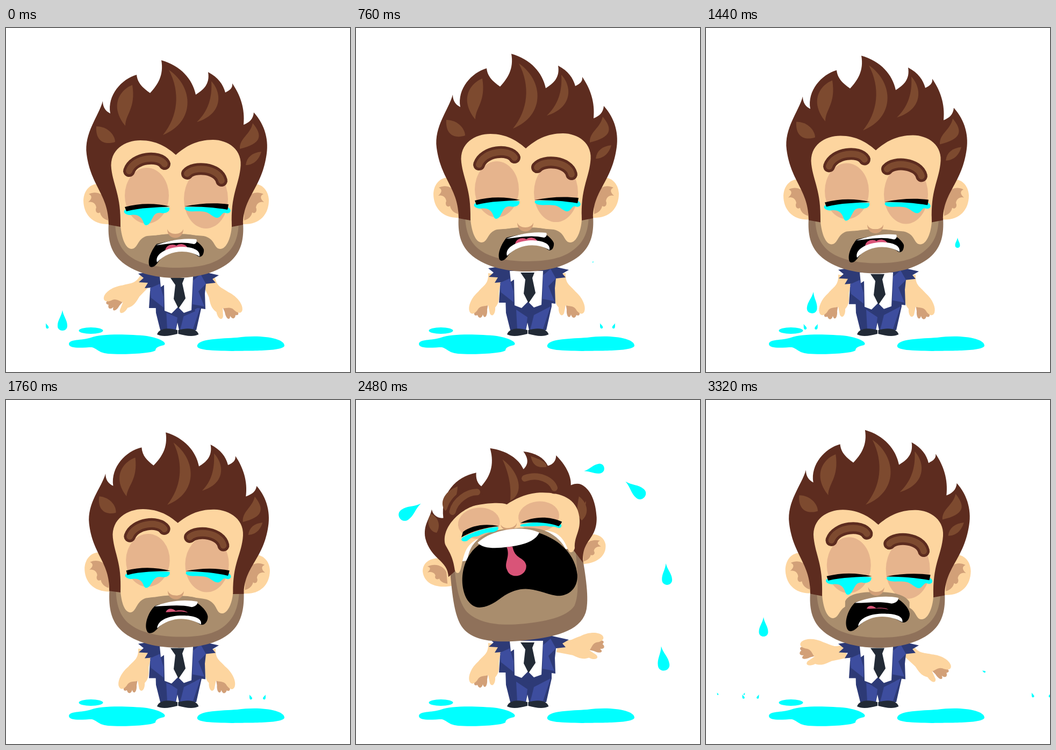
Animation, 640 px wide and 640 px high, one loop 3360 ms. Source, as an HTML page with a canvas:

```html
<!DOCTYPE html>
<html>
<head>
<meta charset="utf-8">
<style>
html, body { margin: 0; width: 100%; height: 100%; overflow: hidden; background: #fff; }
canvas { display: block; }
</style>
</head>
<body>
<canvas id="stage" width="640" height="640"></canvas>
<script>
const ctx = document.getElementById('stage').getContext('2d');
const LOOP = 3360, STEP = 40, GRAVITY = .004, FLOOR = 566;
const SKIN = '#fdd59f', SHADE = '#d2a078', LID = '#e6b48d', HAIR = '#5d2c1f', SHINE = '#7d4a2f',
  BEARD = '#a98d6d', JAW = '#8f715a', TEAR = '#00ffff', NAVY = '#2d3a76', BLUE = '#3d4d9e', DARK = '#222a36';

// Each shape: [calm outline, wailing outline]
const hair = [
  'M191 366C191 310 158 295 150 235C145 195 172 165 180 136C180 148 186 155 194 159C188 125 215 95 243 87C245 104 256 112 268 121C282 106 294 88 289 60C325 70 347 95 353 124C366 116 380 105 376 82C395 92 404 105 408 120C416 116 422 112 421 103C436 125 445 150 442 180C452 176 460 170 461 157C482 180 490 210 484 240C474 300 441 315 441 366L420 370L415 300L220 300L213 370Z',
  'M184 316C186 285 154 280 148 240C146 215 160 205 165 188C166 198 174 206 185 206C184 160 215 132 254 128C252 138 254 148 261 154C278 138 290 118 284 85C314 92 336 110 342 130C352 122 354 112 345 97C368 102 382 112 388 128C398 126 404 120 405 110C420 128 430 150 427 168C440 164 446 168 451 172C466 185 470 210 469 232C466 275 436 270 436 314L421 290L415 240L205 240L198 306Z'];
const shines = [
  ['M168 183C190 183 203 200 203 212C185 218 166 212 168 183Z', 'M163 196C178 205 178 222 170 232C158 230 150 210 163 196Z'],
  ['M235 106C212 115 192 145 222 182C222 160 242 150 235 106Z', 'M217 150C188 158 180 180 190 193C205 182 214 172 217 150Z'],
  ['M303 78C350 110 352 175 292 199C320 165 325 120 303 78Z', 'M305 108C335 135 340 175 312 186C316 165 316 140 305 108Z'],
  ['M382 99C402 120 404 160 355 175C376 155 384 130 382 99Z', 'M358 107C376 115 388 122 385 130C372 130 360 128 358 107Z'],
  ['M459 177C478 200 476 215 435 225C434 205 455 198 459 177Z', 'M440 190C456 205 456 225 441 235C430 222 436 205 440 190Z'],
  ['M475 230C470 248 458 255 446 255C448 240 458 232 475 230Z', 'M452 200C452 205 450 210 448 212C448 206 450 202 452 200Z']];
const jaw = [
  'M191 362L441 362C443 392 438 415 420 432C396 455 355 465 316 465C277 465 236 455 212 432C194 415 189 392 191 362Z',
  'M188 290L434 285C438 330 441 375 434 400C424 436 380 447 316 447C270 447 222 443 202 414C186 390 188 340 188 290Z'];
const beard = [
  'M203 362C204 392 212 412 232 426C252 440 284 446 316 446C350 446 380 442 400 428C424 412 432 392 433 362Z',
  'M197 290C196 330 198 365 212 384C232 408 270 416 312 416C355 416 395 412 412 392C424 372 424 330 424 290Z'];
const skin = [
  'M316 236C334 220 355 208 385 208C412 208 442 226 436 262C432 295 418 310 420 368C419 390 410 412 398 411C386 410 390 392 368 387C340 384 290 384 262 387C244 392 246 410 234 411C222 411 215 390 213 368C214 310 200 295 196 262C192 226 222 209 250 209C280 209 300 222 316 236Z',
  'M305 192C320 184 340 176 362 176C400 177 436 190 437 228C438 255 424 262 423 285C421 290 418 293 414 292C408 290 410 268 390 254C360 236 260 236 232 258C212 272 212 305 204 310C200 311 199 310 197 305C196 280 190 270 184 256C178 222 222 190 250 188C280 186 295 188 305 192Z'];
const moustache = [
  'M262 395C268 384 300 383 316 383C335 383 362 384 370 395L370 420L262 420Z',
  'M222 290C232 236 290 236 312 238C340 236 390 240 408 290L408 300L222 300Z'];
const nose = [
  'M300 374C300 396 330 396 330 374C326 386 304 386 300 374Z',
  'M290 228C290 244 320 244 320 228C316 239 294 239 290 228Z'];
const brows = [
  ['M229 266C238 240 285 236 295 253', 'M203 196C210 175 235 162 252 164'],
  ['M337 271C350 256 395 260 401 284', 'M343 147C370 140 392 155 396 170']];
const lids = [
  [[262, 312, 41, 52], [250, 222, 39, 29]],
  [[372, 318, 41, 55], [362, 220, 38, 28]]];
const lashes = [
  ['M221 333C250 325 280 326 305 332C280 334 250 334 224 341Z', 'M219 235C235 225 262 223 286 231C262 231 236 235 215 245Z'],
  ['M332 332C360 326 390 325 414 328C413 333 413 336 412 338C390 334 360 332 332 332Z', 'M327 229C350 219 380 220 404 234C402 238 399 240 397 242C380 232 350 229 327 229Z']];
const tears = [
  ['M222 338C250 334 280 332 304 334C306 342 296 346 288 344C276 342 274 352 270 358C266 368 258 370 256 362C252 350 244 346 232 348C222 348 216 342 222 338Z',
   'M218 245C240 236 262 232 284 232C288 236 282 240 274 241C262 240 256 242 250 244C246 246 242 246 238 246C234 246 230 250 224 253C214 254 212 248 218 245Z'],
  ['M334 333C360 332 390 334 414 334C422 340 416 347 408 344C402 342 400 352 394 353C386 354 380 344 370 342C358 340 350 342 342 341C334 340 330 336 334 333Z',
   'M328 232C350 228 380 232 400 236C406 242 400 248 394 244C388 240 384 242 378 240C372 238 366 238 360 238C350 237 342 237 336 236C326 236 324 234 328 232Z']];
const mouth = [
  'M280 402C300 397 325 391 350 394C357 398 366 406 368 412C369 420 364 428 358 425C335 408 300 414 284 434C279 442 272 448 267 443C262 430 272 412 280 402Z',
  'M246 262C280 245 330 240 358 250C400 268 423 300 423 335C422 362 400 374 380 370C345 360 325 338 278 364C262 374 248 379 236 378C200 374 196 292 246 262Z'];
const tongue = [
  'M296 414C298 402 312 401 317 405C322 400 334 401 338 409C325 407 310 410 296 414Z',
  'M297 271C303 290 288 300 294 314C298 332 330 330 330 308C328 292 310 296 308 271Z'];
const upperTeeth = [
  'M279 404C300 396 328 390 354 393C356 397 354 401 350 402C325 396 302 402 279 404Z',
  'M244 258C270 236 330 232 360 250C352 266 325 271 300 271C275 272 254 270 244 258Z'];
const lowerTeeth = [
  'M281 436C276 420 300 408 325 407C345 407 362 412 360 425C335 410 302 414 281 436Z',
  'M278 364C325 338 345 360 380 370C380 370 380 370 380 370C345 360 325 338 278 364Z'];

// Drops: time, x, y, vx, vy at that time, age by then, size
const drops = [
  [-50, 88, 566, 0, 1, 100, 1], [0, 105, 545, 0, 1, 200, 1], [340, 182, 560, -.1, 1, 250, 1],
  [440, 468, 394, 0, .1, 45, 1], [1000, 422, 560, -.08, 1, 250, .9], [1080, 217, 364, -.07, 0, 8, 1],
  [1440, 198, 512, -.07, .8, 230, 1.05], [1440, 468, 400, 0, .12, 50, 1],
  [2040, 150, 560, -.1, .9, 150, .8], [2080, 483, 154, .22, .02, 200, 1.2],
  [2480, 578, 325, .08, 1.1, 380, 1.05], [2480, 520, 167, .22, .18, 230, 1.2],
  [2480, 444, 129, .3, -.05, 170, 1], [2480, 100, 207, -.13, .09, 200, 1.25],
  [2800, 90, 230, -.12, .2, 200, 1.1], [2840, 530, 180, .24, .2, 220, 1.1],
  [3250, 83, 562, 0, 1, 200, .9], [3320, 107, 423, 0, .9, 240, .95], [3320, 517, 505, .3, .15, 18, 1]];

// Time, value pairs
const HEAD_Y = [0, 0, 200, -16, 480, -2, 700, -15, 900, 0, 1140, -15.5, 1700, -3, 1860, 0, 2840, 0, 3100, -9, 3320, -4];
const WAIL = [1720, 0, 1900, 1, 2840, 1, 3080, 0];
const MOUTH = [1720, 0, 1900, 1, 2840, 1, 3100, .25, 3320, .15];
const LEAN = [3080, 0, 3320, .7];
const ARM_L = [0, 33, 120, 0, 1740, 0, 2060, 92, 2480, 0, 2860, 92, 3180, 88, 3320, 67];
const ARM_R = [0, 14, 120, 0, 1740, 0, 2080, 58, 2480, 68, 2900, 58, 3200, 55, 3320, 36];

const lerp = (a, b, k) => a + (b - a) * k;

function track(t, keys) {
  if (t <= keys[0]) return keys[1];
  for (let i = 2; i < keys.length; i += 2) {
    if (t <= keys[i]) {
      const p = (t - keys[i - 2]) / (keys[i] - keys[i - 2]);
      return lerp(keys[i - 1], keys[i + 1], (1 - Math.cos(Math.PI * p)) / 2);
    }
  }
  return keys[keys.length - 1];
}

function morph([a, b], k) {
  const ends = b.match(/[\d.]+/g);
  let i = 0;
  return a.replace(/[\d.]+/g, n => lerp(+n, +ends[i++], k).toFixed(2));
}

function fill(path, color) {
  ctx.fillStyle = color;
  ctx.fill(new Path2D(path));
}

function oval(x, y, rx, ry, color) {
  ctx.fillStyle = color;
  ctx.beginPath();
  ctx.ellipse(x, y, rx, ry, 0, 0, 7);
  ctx.fill();
}

function group(draw) {
  ctx.save();
  draw();
  ctx.restore();
}

function turn(deg, x, y) {
  ctx.translate(x, y);
  ctx.rotate(deg * Math.PI / 180);
  ctx.translate(-x, -y);
}

function mirror(axis) {
  ctx.translate(axis * 2, 0);
  ctx.scale(-1, 1);
}

function puddles() {
  fill('M117 588C118 578 140 582 158 576C180 568 230 570 262 573C290 578 300 586 294 590C285 592 278 594 278 600C270 606 215 608 190 606C172 604 172 598 160 594C145 594 118 598 117 588Z', TEAR);
  oval(158, 563, 22.5, 6, TEAR);
  fill('M356 590C360 578 400 578 430 576C470 570 518 576 518 591C516 602 450 600 420 601C385 600 352 600 356 590Z', TEAR);
}

function arm(deg) {
  turn(deg, 258, 470);
  fill('M224 532C217 542 220 547 226 544C228 551 234 551 236 543C238 552 245 548 244 534L246 522L230 522Z', SHADE);
  fill('M246 466C247 486 238 488 228 500C214 512 208 528 211 537C214 545 222 542 227 533C232 526 240 528 246 526L249 541C254 550 260 540 259 530C268 520 266 510 266 500L272 470Z', SKIN);
}

function legs() {
  fill('M278 498L364 498L364 518L354 562L322 562L319 548L316 562L287 562L279 530Z', NAVY);
  fill('M298 524L319 538L316 562L300 562Z', BLUE);
  fill('M331 534L362 518L348 560L324 562Z', BLUE);
  const shoe = 'M281 570C284 560 298 556 319 562L319 569C305 573 290 575 281 570Z';
  fill(shoe, DARK);
  group(() => { mirror(319.7); fill(shoe, DARK); });
}

function torso() {
  fill('M246 457L280 452L360 452L396 460L384 467L390 474L372 476L370 494L371 523L350 520L352 527L322 540L290 526L290 521L266 521L268 490L270 483L258 484L264 474L247 473L256 465Z', NAVY);
  fill('M268 484L286 476L293 500L293 520L270 502Z', BLUE);
  fill('M348 470L362 458L372 476L358 490L369 518L347 514Z', BLUE);
  fill('M286 462L348 462L345 525L331 530L320 519L308 531L295 526L294 478L288 482Z', '#fff');
  fill('M306 465L332 465L328 475L334 503L321 522L312 504L315 478Z', DARK);
}

function ear(x, y, k) {
  ctx.translate(x, y);
  ctx.scale(lerp(1, .95, k), lerp(1, .72, k));
  ctx.translate(-170, -327);
  fill('M200 304C178 280 146 288 144 320C144 350 165 370 202 364Z', SKIN);
  fill('M154 309C172 300 187 314 190 328L190 358C182 356 176 350 175 343C169 347 165 340 168 334C167 326 160 322 153 324C160 318 161 312 154 309Z', SHADE);
}

function head(k, m) {
  group(() => ear(lerp(170, 162, k), lerp(327, 306, k), k));
  group(() => { mirror(316.5); ear(lerp(170, 177, k), lerp(327, 289, k), k); });
  fill(morph(jaw, k), JAW);
  fill(morph(beard, k), BEARD);
  fill(morph(hair, k), HAIR);
  shines.forEach(s => fill(morph(s, k), SHINE));
  fill(morph(skin, k), SKIN);
  lids.forEach(([a, b]) => oval(...a.map((v, i) => lerp(v, b[i], k)), LID));
  fill(morph(moustache, m), BEARD);
  tears.forEach(s => fill(morph(s, k), TEAR));
  lashes.forEach(s => fill(morph(s, k), '#000'));
  ctx.lineCap = 'round';
  brows.forEach(s => {
    const line = new Path2D(morph(s, k));
    [[HAIR, 22], [SHINE, 12]].forEach(([color, width]) => {
      ctx.strokeStyle = color;
      ctx.lineWidth = width;
      ctx.stroke(line);
    });
  });
  fill(morph(nose, m), SHADE);
  fill(morph(mouth, m), '#000');
  fill(morph(tongue, m), '#d95478');
  fill(morph(lowerTeeth, m), '#fff');
  fill(morph(upperTeeth, m), '#fff');
}

function drop(x, y, vx, vy, size) {
  group(() => {
    ctx.translate(x, y);
    ctx.rotate(Math.atan2(vy, vx) - Math.PI / 2);
    ctx.scale(size, size);
    fill('M0 -20C2 -8 9 -2 9 9C9 21 -9 21 -9 9C-9 -2 -2 -8 0 -20Z', TEAR);
  });
}

function rain(t) {
  for (const [when, x, y, vx, vy, age, size] of drops) {
    const s = t - when;
    if (s < -age) continue;
    const land = (Math.sqrt(vy * vy + 2 * GRAVITY * (FLOOR - y)) - vy) / GRAVITY;
    const since = s - land;
    if (since < 0) {
      const grown = Math.min(1, (s + age) / 100);
      drop(x + vx * s, y + vy * s + GRAVITY * s * s / 2, vx, vy + GRAVITY * s, size * grown);
    } else if (since < 180) {
      const bit = size * .35 * (1 - since / 240);
      for (const side of [-1, 1]) {
        drop(x + vx * land + side * (6 + .12 * since), FLOOR - .28 * since + .001 * since * since, -side * .4, 1, bit);
      }
    }
  }
}

function draw(t) {
  const k = track(t, WAIL), y = track(t, HEAD_Y), lean = track(t, LEAN);
  const swing = 3 - 8.5 * Math.cos(2 * Math.PI * (t - 2480) / 496);
  ctx.clearRect(0, 0, 640, 640);
  puddles();
  legs();
  group(() => {
    ctx.translate(0, y * .85 - 14 * k);
    group(() => arm(track(t, ARM_L)));
    group(() => { mirror(318); arm(track(t, ARM_R)); });
    torso();
  });
  group(() => {
    ctx.translate(lean * 3, y);
    turn(k * swing + lean, 315, 447);
    head(k, track(t, MOUTH));
  });
  rain(t);
}

const start = performance.now();
function tick() {
  const t = (performance.now() - start) % LOOP;
  draw(Math.floor(t / STEP) * STEP);
  requestAnimationFrame(tick);
}
tick();
</script>
</body>
</html>
```
